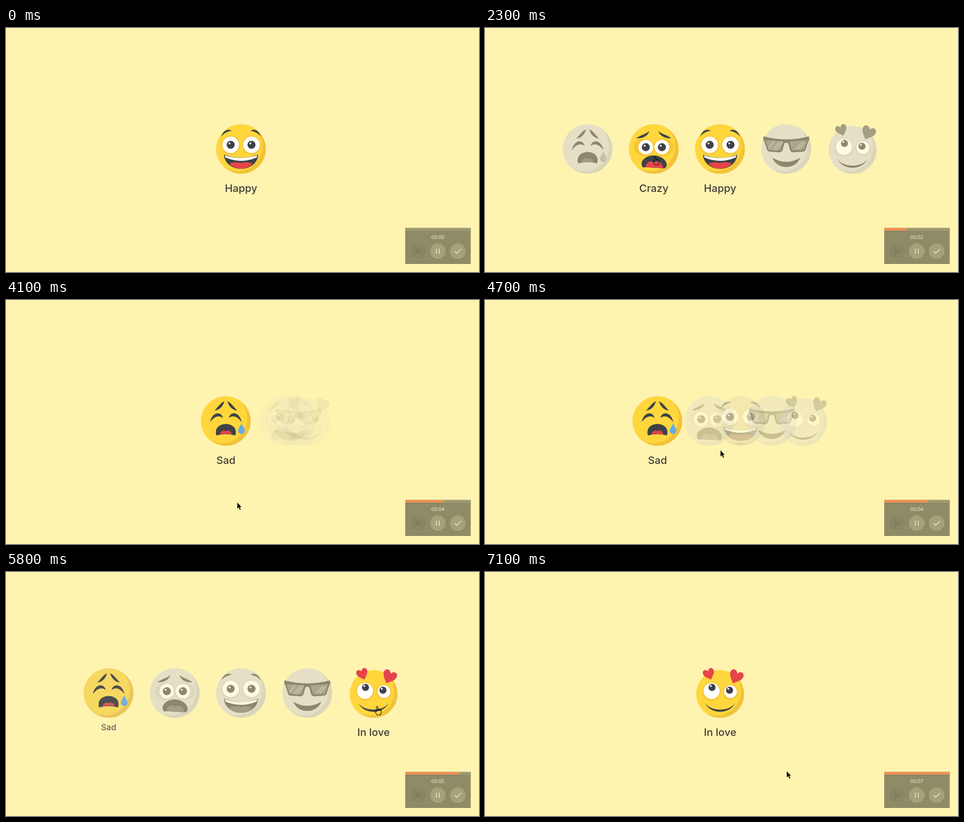
These frames come from a looping animation (1000 px wide and 518 px high, 7200 ms). An HTML page:

```html
<!DOCTYPE html>
<html lang="en">
<head>
<meta charset="utf-8">
<title>Mood picker</title>
<style>
  html, body { margin: 0; width: 100%; height: 100%; overflow: hidden; background: #fff3b0; }
  svg { display: block; width: 100%; height: 100%; }
  .label { font: 500 22px Inter, sans-serif; fill: #403d39; text-anchor: middle; }
  .clock { font: 10.8px "Open Sans", sans-serif; fill: #f4f0dc; text-anchor: middle; }
  .base { fill: #f2c339; }
  .skin { fill: #ffd63c; }
  .patch { fill: #f4c638; }
  .dark { fill: #3e4248; }
  .white { fill: #fff; }
  .red { fill: #e6444b; }
  .lens { fill: #74757a; }
  .line { fill: none; stroke: #f4f0dc; stroke-width: 1.5; }
</style>
</head>
<body>
<svg viewBox="0 0 1000 518">
  <defs>
    <clipPath id="round"><circle r="52.5"/></clipPath>
    <clipPath id="lensClip"><path id="lensShape" d="M-44-19Q-24-17-7-16L-11 0Q-12 3-16 3L-33 2Q-37 2-38-1Z"/></clipPath>
    <path id="heart" d="M0 0C-4-5-12-10-12-17C-12-25-3-26 0-18.500C3-26 12-25 12-17C12-10 4-5 0 0Z"/>
  </defs>
  <rect width="1000" height="518" fill="#fff3b0"/>
  <g id="items"></g>
  <g id="panel">
    <rect x="844" y="424.500" width="138.500" height="76.500" fill="#8f8b67"/>
    <rect x="844" y="424.500" width="138.500" height="5.500" fill="#9f9b70"/>
    <rect id="bar" x="844" y="424.500" height="5.500" fill="#f09259"/>
    <text id="clock" class="clock" x="913" y="448"></text>
    <circle cx="871" cy="473.800" r="16.500" fill="#8a8562"/>
    <circle cx="913" cy="473.800" r="16.500" fill="#a5a17a"/>
    <circle cx="955" cy="473.800" r="16.500" fill="#a5a17a"/>
    <path class="line" style="stroke:#777252;stroke-width:1.200" d="M865.500 468L877 479.500M877 468L865.500 479.500"/>
    <path class="line" d="M910 468.500V479.500M916 468.500V479.500"/>
    <path class="line" d="M948.500 474L953 478.500L962 469"/>
  </g>
  <path id="arrow" fill="#111" d="M0 0V13L3 10.300L5.200 15.600L7.400 14.700L5.200 9.600H9Z"/>
  <path id="hand" fill="none" stroke="#151515" stroke-width="1.200" stroke-linejoin="round"
    d="M-2 11.500V1.500Q-.5-.8 1 1.500V9M1 6.500Q2.600 4.800 3.900 6.500V9.500M3.900 7Q5.400 5.600 6.400 7.500V10M6.400 8Q8.200 7 8.400 9V13.500L6.600 18.500H-.4L-5 12Q-5 8.800-2 11.500"/>
</svg>
<script>
const LOOP = 7200, MID = 497, SLOT = 140, FADE = 500;
const $ = id => document.getElementById(id);

const shape = (cls, d) => `<path class="${cls}" d="${d}"/>`;
const disc = (cls, x, y, r) => `<circle class="${cls}" cx="${x}" cy="${y}" r="${r}"/>`;
const both = s => s + `<g transform="scale(-1 1)">${s}</g>`;
const eye = (x, y, r, px = x, py = y, pr = 8.5) =>
  disc('patch', x, y + 1, r + 2.5) + disc('white', x, y, r) +
  disc('dark', px, py, pr) + disc('white', px - 2.5, py - 3, 2);
const head = disc('base', 0, 0, 52.5) +
  `<g clip-path="url(#round)">${disc('skin', -8, -6, 53)}</g>`;
const heart = (x, y, turn, size) =>
  `<use href="#heart" class="red" transform="translate(${x} ${y}) rotate(${turn}) scale(${size})"/>`;

const glint = '<g clip-path="url(#lensClip)" stroke="#a3a3a4" stroke-width="2.500">' +
  '<path d="M-32 6L-10-20M-26 7L-4-20M-39 0L-22-21"/></g>';

const faces = [
  { name: 'Sad', art: head +
    both(shape('dark', 'M-24-22.500C-13-23-5-33-3.500-42C-12-38-17-29-24-22.500Z') +
      shape('dark', 'M-33.500 2.500C-29-20-10-22-6-6.500C-14-13-24-11-33.500 2.500Z')) +
    shape('dark', 'M-20 30.500C-30-2 30-2 20 30.500Q0 25-20 30.500Z') +
    shape('red', 'M-13 28.500C-10 19-3 19 0 21.500C4 19 10 19 13 28.500Q0 26-13 28.500Z') +
    '<path fill="#61abe8" d="M33 5C36 12 40 16 40 20.500A7 7 0 0 1 26 20.500C26 16 30 12 33 5Z"/>' },
  { name: 'Crazy', art: head +
    both(shape('dark', 'M-37-23C-25-22-13-27-9.500-38C-18-31-28-30-37-23Z')) +
    '<ellipse class="patch" cx="-21" cy="-4" rx="21" ry="18"/><ellipse class="patch" cx="21" cy="-4" rx="21" ry="18"/>' +
    eye(-17, -4, 15.5) + eye(17, -4, 15.5) +
    shape('dark', 'M-25 36C-30 22-12 13 0 13.500C16 14 28 25 27 34C26 42 21 41 15 40.500L-18 38.500Q-24 40-25 36Z') +
    shape('red', 'M-18 38.500C-15 25-5 24 1 28.500C8 23 18 28 20 40.500Z') },
  { name: 'Happy', art: head +
    both(shape('dark', 'M-42-26.500C-37-40-27-44-20-38.500C-28-38-36-34-42-26.500Z')) +
    eye(-22, -9, 17.5) + eye(22, -9, 17.5) +
    shape('dark', 'M-36 12Q0 25 36 12C36 29 19 42 0 42C-19 42-36 29-36 12Z') +
    shape('white', 'M-34.500 13.500Q0 24 34.500 13.500L33 18Q0 32-33 18Z') +
    shape('red', 'M-25 30.500Q-13 26 0 29.500Q13 26 25 30.500C18 38 9 42 0 42C-9 42-18 38-25 30.500Z') },
  { name: 'Cool', art: head +
    shape('dark', 'M-48-27Q0-14 48-27L49-20L46-16L41 1Q40 5 35 5.500L14 7Q9 6 8 2L4-12Q0-15-4-12L-8 2Q-9 6-14 7L-35 5.500Q-40 5-41 1L-46-16L-49-20Z') +
    both('<use href="#lensShape" class="lens"/>') + glint + `<g transform="translate(51 0)">` +
    `<g stroke="#a3a3a4" stroke-width="2.500"><path d="M-31 0L-17-15M-25 0L-12-14"/></g></g>` +
    shape('dark', 'M-29.500 18.500Q0 36 29.500 18.500C25 31 13 38 0 38C-13 38-25 31-29.500 18.500Z') },
  { name: 'In love', art: `<g transform="translate(.3 2) scale(.962)">${head}</g>` +
    eye(-18, -4.5, 17, -17, -12, 7.5) + eye(22, -3, 13.5, 20, -6, 7.5) +
    shape('dark', 'M-32 21C-20 46 20 46 32 21C20 40-20 40-32 21Z') +
    heart(-19, -28.5, -20, 1) + heart(27, -20.5, 24, 1.22) }
];

$('items').innerHTML = faces.map(f =>
  `<g><g>${f.art}</g><text class="label" y="91">${f.name}</text></g>`).join('');
const nodes = [...$('items').children];

// [time, target] switches; the first entry is the state at the start
const lit = [
  [[0, 0], [2370, 1], [5720, 0]],
  [[0, 0], [1720, 1], [2340, 0]],
  [[0, 1], [3100, 0], [4600, 1], [5040, 0]],
  [[0, 0], [5080, 1], [5150, 0]],
  [[0, 0], [5190, 1]]
];
const opened = [[0, 0], [820, 1], [3800, 0], [4560, 1], [6200, 0]];

const pointer = [
  [0, 954, 517], [500, 740, 410], [800, 560, 330], [1000, 514, 285], [1300, 513, 278],
  [1600, 480, 277], [1900, 365, 272], [2300, 360, 272], [2400, 232, 272], [2600, 215, 278],
  [3400, 222, 285], [3800, 330, 365], [4100, 489, 430], [4300, 489, 431], [4560, 495, 360],
  [4800, 500, 290], [5000, 535, 285], [5200, 788, 278], [5800, 785, 285], [6050, 750, 330],
  [6200, 712, 372], [6300, 685, 401], [6500, 660, 418], [7100, 638, 423]
];

const mix = (a, b, k) => a + (b - a) * k;

// CSS "ease": cubic-bezier(.25, .1, .25, 1)
function ease(x) {
  if (x <= 0) return 0;
  if (x >= 1) return 1;
  let lo = 0, hi = 1, u = x;
  for (let i = 0; i < 24; i++) {
    u = (lo + hi) / 2;
    const at = .75 * u * (1 - u) ** 2 + .75 * u * u * (1 - u) + u ** 3;
    if (at < x) lo = u; else hi = u;
  }
  return .3 * u * (1 - u) ** 2 + 3 * u * u * (1 - u) + u ** 3;
}

function level(steps, t) {
  let value = steps[0][1];
  for (let i = 1; i < steps.length && steps[i][0] <= t; i++) {
    const [start, goal] = steps[i];
    const end = i + 1 < steps.length ? Math.min(t, steps[i + 1][0]) : t;
    value = mix(value, goal, ease((end - start) / FADE));
  }
  return value;
}

function pointerAt(t) {
  const i = pointer.findIndex(p => p[0] > t);
  if (i < 0) return pointer[pointer.length - 1].slice(1);
  const [t0, x0, y0] = pointer[i - 1], [t1, x1, y1] = pointer[i];
  const k = (t - t0) / (t1 - t0);
  return [mix(x0, x1, k), mix(y0, y1, k)];
}

function draw(t) {
  const picked = t < 3100 ? 2 : t < 5700 ? 0 : 4;
  const open = level(opened, t), shut = 1 - open;
  const slim = SLOT * open, wide = SLOT - 85 * shut + 207 * shut * shut;
  const [px, py] = pointerAt(t);
  let left = MID - (4 * slim + wide) / 2, over = false;

  nodes.forEach((node, i) => {
    const width = i === picked ? wide : slim;
    const x = left + width / 2, k = level(lit[i], t);
    const alpha = i === picked ? mix(.6, 1, k) : mix(.6, 1, k) * open;
    left += width;
    node.setAttribute('transform', `translate(${x.toFixed(2)} 257)`);
    const [face, label] = node.children;
    face.style.opacity = alpha;
    face.style.filter = k > .995 ? 'none' : `grayscale(${1 - k})`;
    label.setAttribute('transform', `translate(0 ${(83 - 50 * (1 - k)).toFixed(2)}) scale(${k.toFixed(3)}) translate(0 -83)`);
    label.style.opacity = i === picked ? k : k * open;
    if (alpha > .02 && Math.hypot(px - x, py - 257) < 53) over = true;
  });

  for (const id of ['arrow', 'hand']) {
    $(id).setAttribute('transform', `translate(${px} ${py})`);
    $(id).style.display = (id === 'hand') === over ? '' : 'none';
  }
  $('bar').setAttribute('width', t ? Math.min(138.5, 2.6 + t * .0193) : 0);
  $('clock').textContent = '00:0' + Math.floor(t / 1000);
}

const begin = performance.now();
function tick() {
  const t = (performance.now() - begin) % LOOP;
  draw(Math.floor(t / 100) * 100);
  requestAnimationFrame(tick);
}
tick();
</script>
</body>
</html>
```
